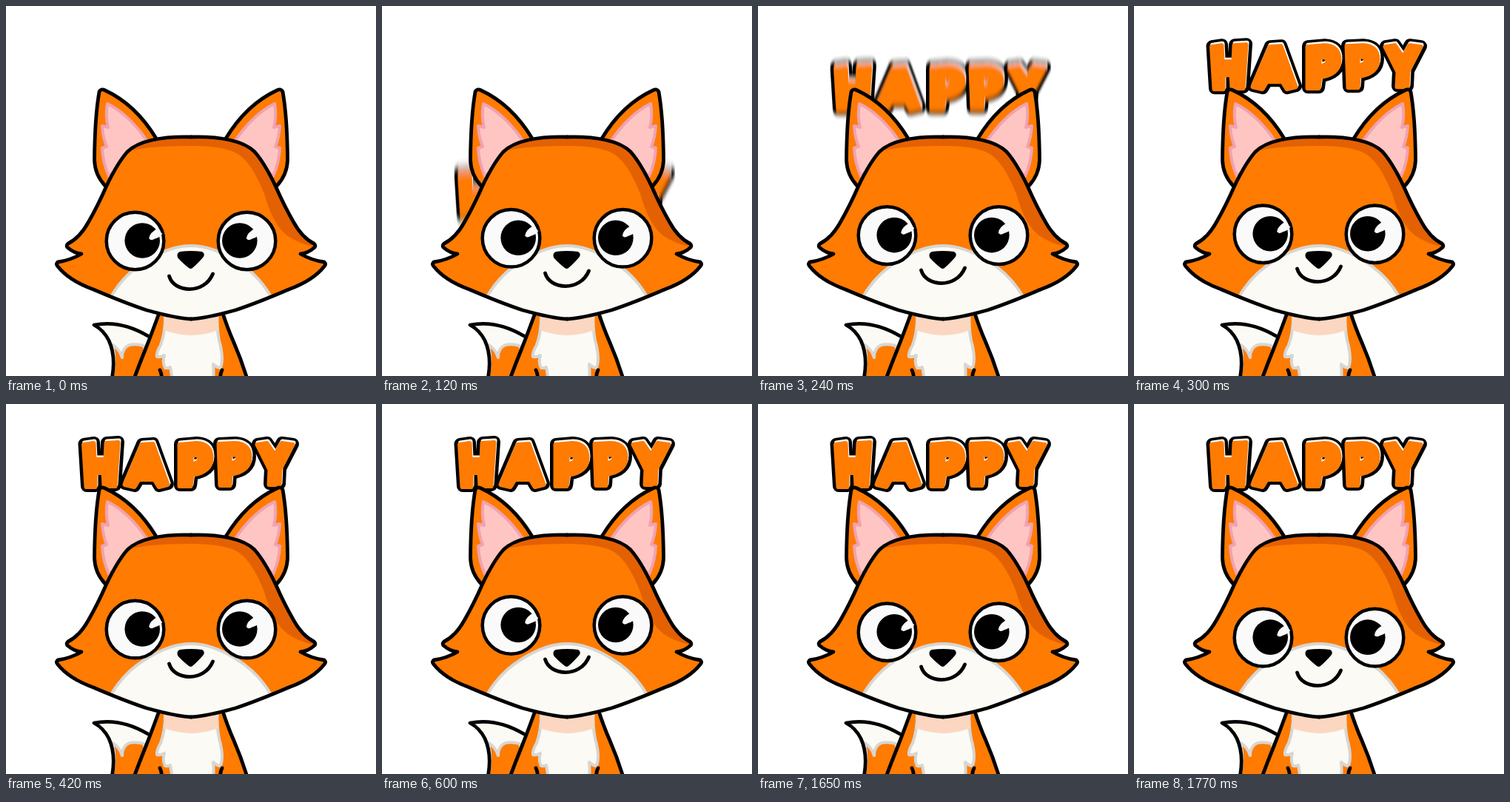
Recreate the animation shown at these times as an HTML page. Size 500x500 px, loop 1800 ms.

```html
<!DOCTYPE html>
<html lang="en">
<head>
<meta charset="utf-8">
<title>Happy fox</title>
<style>
  html, body { margin: 0; width: 100%; height: 100%; overflow: hidden; background: #fff; }
  svg { display: block; width: 100%; height: 100%; }
  .ink { fill: none; stroke: #000; stroke-width: 4.8; stroke-linecap: round; stroke-linejoin: round; }
  .fur { fill: #ff7b02; }
  .white { fill: #fbfaf5; }
  .edge { stroke: #d8d6d1; stroke-width: 4; stroke-linejoin: round; }
  .letters { stroke-linejoin: round; stroke-width: 6; fill-rule: evenodd; }
</style>
</head>
<body>
<svg viewBox="0 0 500 500" role="img" aria-label="A fox and the word HAPPY">
  <defs>
    <path id="half" d="M250 177 Q220 176 198 181 Q175 186 164 197 Q150 213 135 245 Q124 270 112 291
      Q100 313 84 321 Q80 324 84 327 Q92 334 102 335 Q86 344 70 346 Q67 349 70 352 Q85 371 118 383
      Q160 401 190 411 Q230 422 250 423"/>
    <path id="muzzle" d="M250 324 Q222 324 190 344 Q160 362 143 391 L150 430 H250"/>
    <g id="ear">
      <path class="ink" style="fill:#ff7b02" d="M134 243 Q120 228 119.5 208 Q120 150 126 116 Q128 111 134 114 Q175 133 203 179"/>
      <path d="M134 243 L203 179 L210 230 Z" class="fur"/>
      <path d="M137 132 Q134 148 138 164 L130 162 Q131 178 136 190 L130 192 Q131 212 139 230 L191 183 Q166 146 137 132 Z"
        fill="#ffc5c2" stroke="#f0a2b1" stroke-width="4" stroke-linejoin="round"/>
    </g>
    <g id="pupil">
      <circle r="23.8"/>
      <path d="M9 -3 Q10 -11 21 -16.5 L27 -9 Q23 -4 17 -2.5 Q11 1 9 -3 Z" fill="#fafafa"/>
    </g>
    <path id="word" d="M105.500 54 L119 52 L120 74 H135 L136 52 L152 51 L148 110 H133 L132 92 H121 V111 H109 Z
      M184 54 L199 53 L219 108 L207 111 L201 101 H180 L174 111 L161 108 Z M191 75 L196 86 H186 Z
      M235 54 L258 52 Q278 53 278 72 Q278 91 252 95 L250 110 H235 Z M251 68 Q262 67 262 73 Q261 80 251 80 Z
      M288 53 L310 52 Q330 53 330 71 Q330 90 304 94 L303 109 H290 Z M303 68 Q314 66 314 72 Q313 79 303 79 Z
      M340 54 L353 52 L364 68 L373 52 L388 54 L371 87 L370 108 H356 L357 88 Z"/>
    <clipPath id="head">
      <use href="#half"/>
      <use href="#half" transform="matrix(-1 0 0 1 500 0)"/>
    </clipPath>
    <filter id="smear" filterUnits="userSpaceOnUse" x="60" y="0" width="380" height="180">
      <feGaussianBlur id="blur" stdDeviation="0 0"/>
    </filter>
  </defs>

  <g id="title"><g id="smeared" class="letters">
    <use href="#word" stroke="#000" stroke-width="16"/>
    <use href="#word" fill="#fff" stroke="#fff" x=".5" y="-1.500"/>
    <use href="#word" class="fur" stroke="#ff7b02" x="-.5" y="1"/>
  </g></g>

  <!-- tail -->
  <path class="white" d="M119 431 Q155 424 192 446 L200 502 H143 Q150 455 119 431 Z"/>
  <path class="fur edge" d="M143 504 Q149 480 144 458 Q153 463 157 475 Q157 462 167 458 Q176 456 186 459 L200 504 Z"/>
  <path class="ink" d="M143 504 Q149 474 139 452 Q132 438 119 431 Q155 424 192 446"/>

  <!-- body -->
  <path class="fur" d="M208 412 Q196 445 188 465 Q178 490 173 504 H326 Q318 478 308 455 Q298 432 292 412 Z"/>
  <path class="white edge" d="M215 410 Q216 440 209 458 Q203 468 204 474 Q209 475 214 472 Q211 482 215 489 Q219 490 222 488 L225 506 H280
    Q281 494 280 484 Q285 489 290 489 Q294 478 290 460 Q284 440 286 410 Z"/>
  <path d="M214 410 V438 Q250 452 287 438 V410 Z" fill="#fbd7c2"/>
  <path class="ink" d="M208 412 Q196 445 188 465 Q178 490 173 504 M326 504 Q318 478 308 455 Q298 432 292 412 M208 492 Q211 498 210 504 M292 492 Q289 498 290 504"/>

  <use href="#ear"/>
  <use href="#ear" transform="matrix(-1 0 0 1 500 0)"/>

  <g clip-path="url(#head)">
    <rect class="fur" x="60" y="170" width="380" height="260"/>
    <path d="M150 170 L165 197 Q185 189 250 189 Q298 189 315 201 Q334 215 349 254 Q359 290 375 306 Q391 321 424 327 L440 300 L380 170 Z" fill="#e46103"/>
    <g class="white edge">
      <use href="#muzzle"/>
      <use href="#muzzle" transform="matrix(-1 0 0 1 500 0)"/>
    </g>
  </g>
  <g class="ink">
    <use href="#half"/>
    <use href="#half" transform="matrix(-1 0 0 1 500 0)"/>
  </g>

  <g id="eyes">
    <g fill="#fafafa" stroke="#000" stroke-width="4.500">
      <circle cx="174.5" cy="317.5" r="38.8"/>
      <circle cx="325.5" cy="317.5" r="38.8"/>
    </g>
    <use href="#pupil" x="184.2" y="317"/>
    <use href="#pupil" x="315.8" y="317"/>
  </g>
  <path id="mouth" class="ink" d="M220.5 365 C227 388 268 390 279.5 362"/>
  <path d="M235 332 Q250 330 265 332 Q270 335 266 340 Q258 349 252 354 Q250 356 247 354 Q237 346 232 340 Q230 334 235 332 Z"/>
</svg>
<script>
  const LOOP = 1800, STEP = 30, RISE = 306;
  const $ = id => document.getElementById(id);
  const clamp = v => Math.min(1, Math.max(0, v));
  const shift = (id, y) => $(id).setAttribute('transform', `translate(0 ${y.toFixed(2)})`);

  function draw(t) {
    // face lifts for 600 ms, holds, then drops over the last 300 ms
    const lift = Math.min(clamp(t / 600), clamp((LOOP - t) / 300));
    shift('eyes', -18.5 * lift);
    shift('mouth', -20 * lift);

    // word rises from behind the head, smeared by its speed
    const u = clamp(t / RISE) * Math.PI;
    shift('title', 258 * (1 + Math.cos(u)) / 2);
    $('blur').setAttribute('stdDeviation', `0 ${(5.5 * Math.sin(u)).toFixed(2)}`);
    if (t > 0 && t < RISE) $('smeared').setAttribute('filter', 'url(#smear)');
    else $('smeared').removeAttribute('filter');
  }

  const start = performance.now();
  function tick() {
    const t = (performance.now() - start) % LOOP;
    draw(Math.floor(t / STEP) * STEP);
    requestAnimationFrame(tick);
  }
  draw(0);
  requestAnimationFrame(tick);
</script>
</body>
</html>
```
